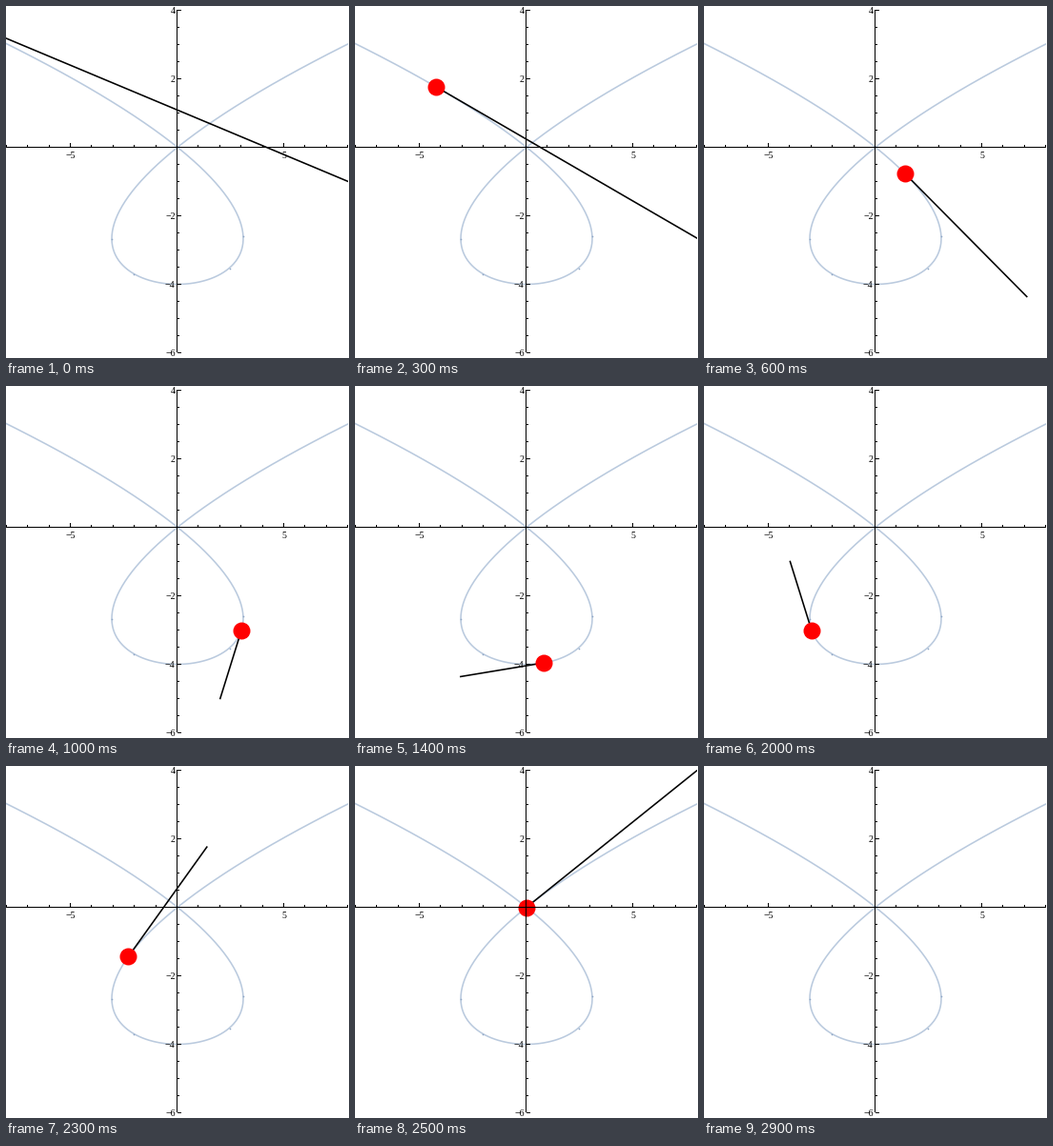
Recreate the animation shown at these times as a matplotlib script. Size 360 by 370 pixels, loop 3100 ms.

```python
import numpy as np
import matplotlib.pyplot as plt
from matplotlib.animation import FuncAnimation
from matplotlib.patches import Rectangle

W, H, DPI = 360, 370, 100
X0, Y0 = 180, 148.5          # pixel position of the plot's zero point
SX, SY = 22.4, 36            # pixels per unit
PX = 72 / DPI                # one pixel in points
FRAMES, INTERVAL = 31, 100
CURVE = "#bacade"


def curve(t):
    return t**3 - 4 * t, t**2 - 4


def velocity(t):
    return 3 * t**2 - 4, 2 * t


def to_px(x, y):
    return X0 + SX * x, Y0 - SY * y


fig = plt.figure(figsize=(W / DPI, H / DPI), dpi=DPI, facecolor="white")
ax = fig.add_axes([0, 0, 1, 1])
ax.set_xlim(0, W)
ax.set_ylim(H, 0)
ax.axis("off")

# everything moving is cut off at the plot range
left, top = to_px(-8, 4)
right, bottom = to_px(8, -6)
clip = Rectangle((0, top - 1), 359, bottom - top + 2, transform=ax.transData)


def stroke(xs, ys, color, width, z, **kw):
    line, = ax.plot(xs, ys, color=color, lw=width * PX, zorder=z, **kw)
    line.set_clip_path(clip)
    return line


def bar(x, y, w, h):
    ax.add_patch(Rectangle((x, y), w, h, fc="black", ec="none",
                           antialiased=False, zorder=5))


def label(x, y, value, ha):
    ax.text(x, y, str(value).replace("-", "\u2212"), ha=ha, va="center_baseline",
            family="Liberation Serif", size=10 * PX, zorder=6)


stroke(*to_px(*curve(np.linspace(-3, 3, 400))), CURVE, 1.6, 1)
for x, y in [(111, 245), (134, 281.5), (234.5, 276), (249, 242)]:
    ax.plot(x, y, "o", ms=1.7 * PX, mew=0, color="#8ea6c6", zorder=1)

# axes with ticks
bar(0, 148, 359, 1)
bar(179, 4, 1, 360)
for k in range(-8, 9):
    size = 4 if k % 5 == 0 else 2
    bar(np.floor(X0 + SX * k - 0.5), 148 - size, 1, size)
for k in range(-12, 9):
    size = 4 if k % 4 == 0 else 2
    bar(180, 148 - 18 * k, size, 1)
for v in (-5, 5):
    label(X0 + SX * v - 0.5, 156.5, v, "center")
for v in (4, 2, -2, -4, -6):
    label(177.5, Y0 - SY * v, v, "right")

tangent = stroke([], [], "black", 1.6, 2)
dot, = ax.plot([], [], "o", ms=18 * PX, mew=0, color="red", zorder=3)
dot.set_clip_path(clip)


def draw(i):
    t = -3 + 0.2 * i
    x, y = curve(t)
    dx, dy = velocity(t)
    px, py = to_px(x, y)
    qx, qy = to_px(x + dx, y + dy)
    tangent.set_data([px, qx], [py, qy])
    dot.set_data([px], [py])
    return tangent, dot


anim = FuncAnimation(fig, draw, frames=FRAMES, interval=INTERVAL,
                     repeat=True, repeat_delay=0)
plt.show()
```
